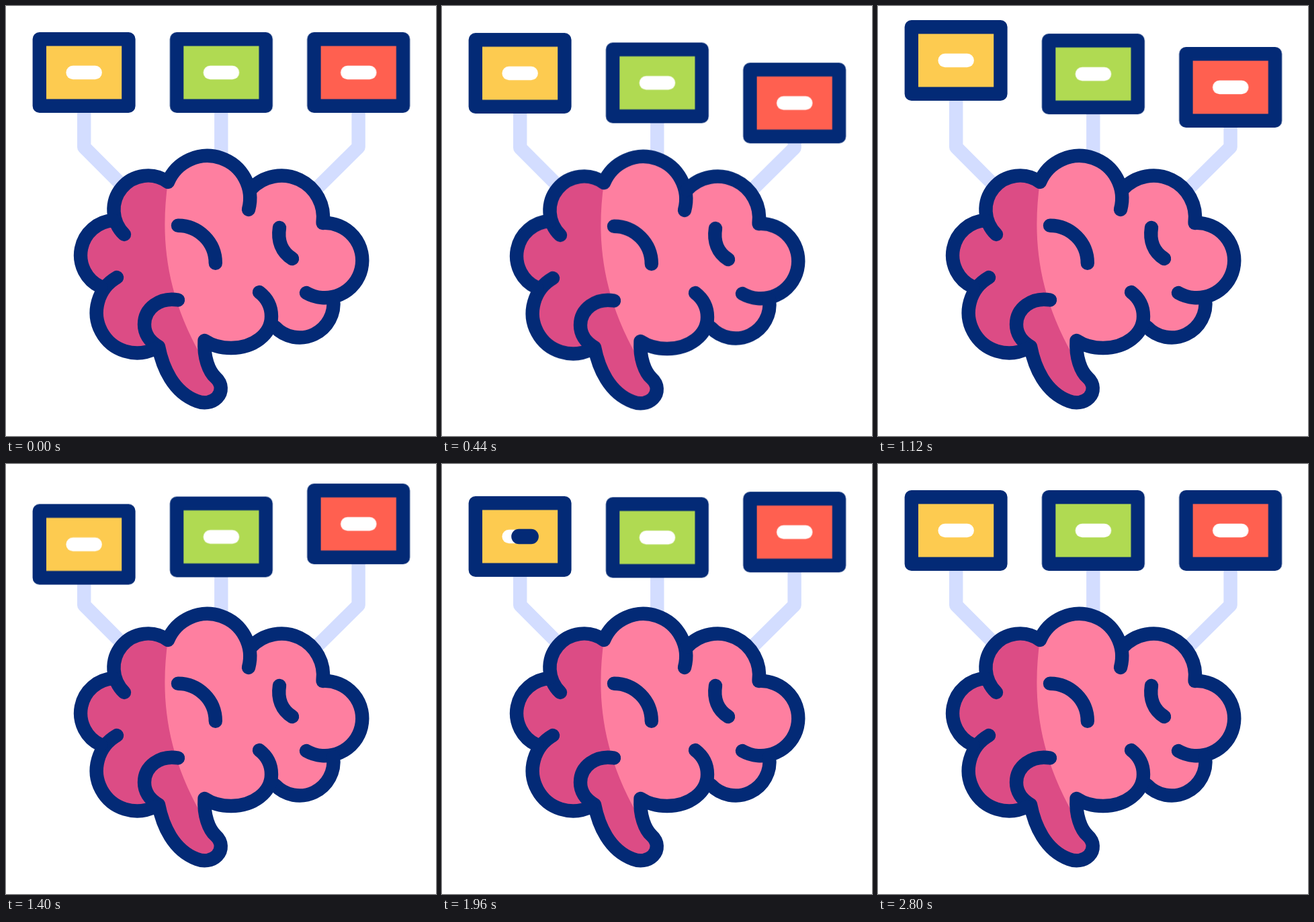
An HTML page for the animation above (3000 ms loop, 640 by 640 pixels).

```html
<!DOCTYPE html>
<html lang="en">
<head>
<meta charset="utf-8">
<title>Brain and cards</title>
<style>
  html, body { margin: 0; width: 100%; height: 100%; overflow: hidden; background: #fff; }
  svg { display: block; width: 100%; height: 100%; }
  .ink { fill: none; stroke: #032a76; stroke-width: 20.4; stroke-linecap: round; stroke-linejoin: round; }
  .wire { fill: none; stroke: #d3ddff; stroke-width: 20.4; stroke-linejoin: round; }
  .dash { stroke: #fff; stroke-width: 20.4; stroke-linecap: round; }
  .mark { fill: none; stroke: #032a76; stroke-width: 22.6; stroke-linecap: round;
          stroke-dasharray: 33 99; stroke-dashoffset: 34; }
</style>
</head>
<body>
<svg viewBox="0 0 640 640">
  <defs>
    <clipPath id="body">
      <path d="M160 319 A50.5 50.5 0 0 1 241 262 A63 63 0 0 1 364 272 A62.5 62.5 0 0 1 471 323
        A56 56 0 0 1 487 433 A50.5 50.5 0 0 1 400 478 C388 497 364 509 335 509 C320 509 306 505 295 497
        C294 523 302 544 312 553 C322 562 322 575 314 583 C306 591 294 592 284 588 C249 575 233 538 227 506
        L222 510 A60.2 60.2 0 0 1 165 404 L141 418 A52 52 0 0 1 160 319Z"/>
    </clipPath>
  </defs>
  <g id="scene">
    <path class="wire" d="M116.2 105V210L182 276M320.3 105V240M524.6 105V210L458 276"/>
    <g clip-path="url(#body)">
      <path fill="#fe7fa0" d="M90 200H560V620H90Z"/>
      <path fill="#dc4c85" d="M241 262C230 340 236 425 290 520H340V620H90V230H241Z"/>
    </g>
    <g class="ink">
      <path d="M176 340 A50.9 50.9 0 0 1 241 262 A63.55 63.55 0 0 1 361 303"/>
      <path d="M365 272 A62 62 0 0 1 471.5 323 A55.7 55.7 0 1 1 447 427"/>
      <path d="M487 436 A50.5 50.5 0 0 1 400 477.4"/>
      <path d="M377 426 C390 436 395 449 395 462 C395 489 368 509 335 509 C320 509 306 505 295.5 498
        C294 523 302 544 312 553 C322 562 322 575 314 583 C306 591 294 592 284 588
        C249 575 233 538 227 507 C213 499 206 487 206 474 C206 450 229 433 256 437.5"/>
      <path d="M222 510 A60.2 60.2 0 0 1 165 404"/>
      <path d="M141 418 A52 52 0 0 1 160 319"/>
      <path d="M256 326.7 A56 56 0 0 1 311.8 382.7"/>
      <path d="M407 330 C404 349 410 366 426 376"/>
    </g>
  </g>
</svg>
<script>
  const LOOP = 3000;
  const SINE = 'cubic-bezier(.37,0,.63,1)';
  const scene = document.getElementById('scene');

  // steps: [ms, value] pairs, held before the first and after the last
  function play(el, steps, toStyle, easing) {
    const all = [[0, steps[0][1]], ...steps, [LOOP, steps[steps.length - 1][1]]];
    const frames = all.map(([ms, v]) => ({ offset: ms / LOOP, easing, ...toStyle(v) }));
    el.animate(frames, { duration: LOOP, iterations: Infinity });
  }

  const delayed = (steps, by) => steps.map(([ms, v]) => [ms + by, v]);
  const moveY = v => ({ transform: `translateY(${v}px)` });
  const trim = v => ({ strokeDashoffset: v });

  const sway = [[0, 0], [295, 24], [545, -12.3], [770, 9.3], [1080, 0]];
  const swing = [[160, 0], [480, 46], [800, -18], [1120, 22], [1400, -9.8], [1720, 12], [2060, 0]];
  const draw = [[1600, 33.1], [1800, 0], [1880, 0], [2060, -33.1]];

  const cards = [
    { x: 0, color: '#fdcb50', swingDelay: 320, drawDelay: 0 },
    { x: 204.3, color: '#b0da52', swingDelay: 160, drawDelay: 370 },
    { x: 408.6, color: '#ff6050', swingDelay: 0, drawDelay: 740 }
  ];

  for (const c of cards) {
    scene.insertAdjacentHTML('beforeend', `
      <g transform="translate(${c.x} 0)"><g>
        <rect class="ink" x="49.8" y="49.3" width="132.6" height="99.4" style="fill:${c.color}"/>
        <path class="dash" d="M99.6 99h33.1"/>
        <path class="mark" d="M99.6 99h33"/>
      </g></g>`);
    const card = scene.lastElementChild.firstElementChild;
    play(card, delayed(swing, c.swingDelay), moveY, SINE);
    play(card.querySelector('.mark'), delayed(draw, c.drawDelay), trim, 'linear');
  }
  play(scene, sway, moveY, SINE);
</script>
</body>
</html>
```
